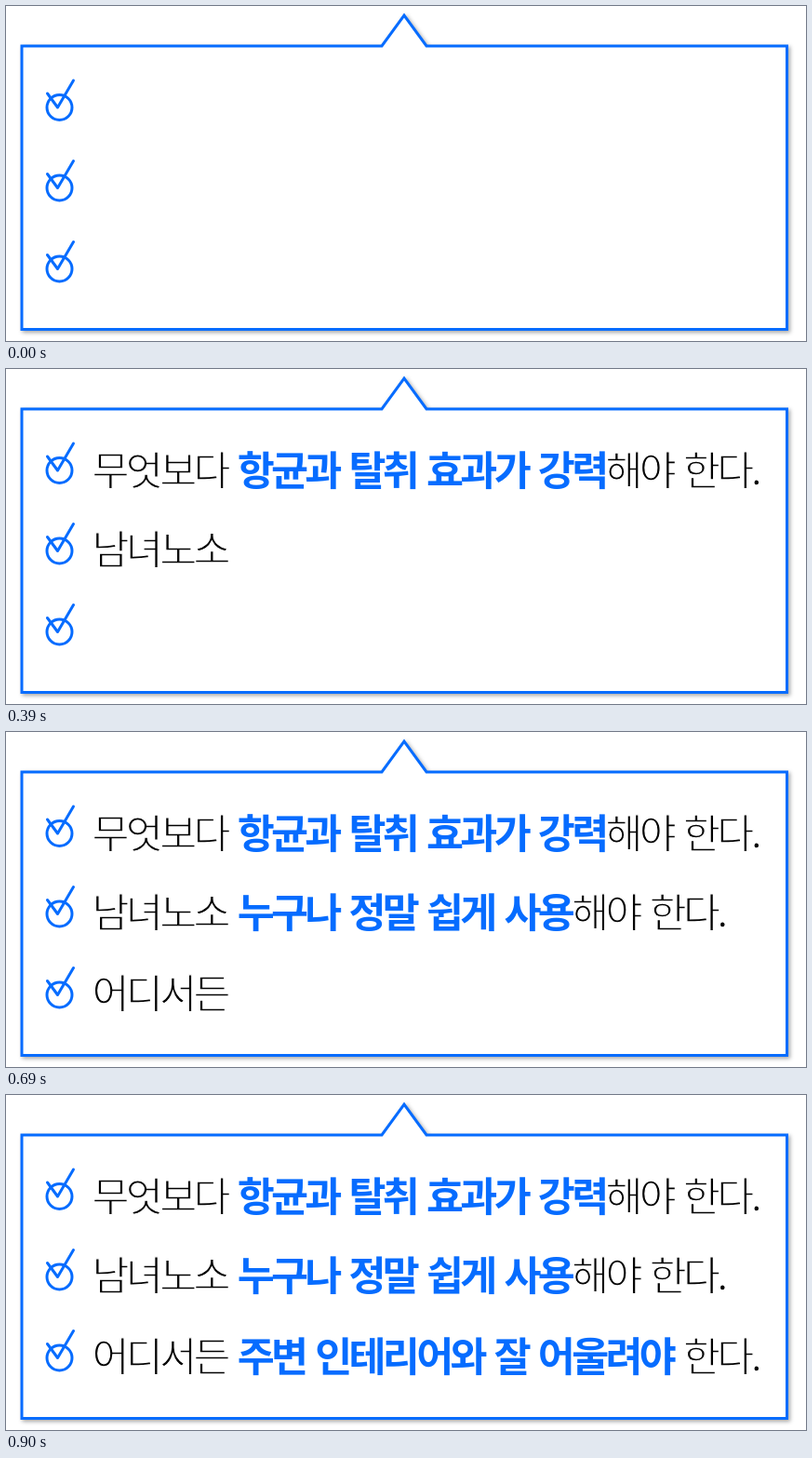
An HTML page for the animation above (1.8 s loop, 860 px wide and 360 px high).

```html
<!DOCTYPE html>
<html lang="ko">
<head>
<meta charset="utf-8">
<style>
  html, body { margin: 0; width: 100%; height: 100%; overflow: hidden; background: #fff; }
  svg { display: block; }
  .panel { fill: #fff; stroke: #066cff; stroke-width: 3; filter: drop-shadow(2px 2px 2px rgba(0, 0, 0, .35)); }
  .check { fill: none; stroke: #066cff; stroke-width: 3; stroke-linecap: round; stroke-linejoin: round; }
  text {
    font: 300 43.5px "Noto Sans CJK KR", "Noto Sans CJK", "Noto Sans KR", sans-serif;
    letter-spacing: -3.7px; word-spacing: 2.4px;
  }
  /* the white outline thins the regular weight to a light one */
  .plain { fill: #000; stroke: #fff; stroke-width: 1.3; }
  .key { font-weight: 700; fill: #066cff; }
</style>
</head>
<body>
<svg id="stage" width="860" height="360" viewBox="0 0 860 360">
  <path class="panel" d="M17 43H404L428 10L452 43H839.5V347.5H17Z"/>
</svg>
<script>
const LOOP = 1800, STEP = 30, WIPE = 300;
const lines = [
  { y: 124.5, mark: 109, from: 92, to: 830, text: ["무엇보다 ", "항균과 탈취 효과가 강력", "해야 한다."] },
  { y: 210, mark: 195.5, from: 94, to: 784, text: ["남녀노소 ", "누구나 정말 쉽게 사용", "해야 한다."] },
  { y: 296.5, mark: 282.5, from: 86, to: 814, text: ["어디서든 ", "주변 인테리어와 잘 어울려야", " 한다."] }
];
const stage = document.getElementById("stage");

function add(parent, name, attrs = {}) {
  const el = document.createElementNS("http://www.w3.org/2000/svg", name);
  for (const key in attrs) el.setAttribute(key, attrs[key]);
  return parent.appendChild(el);
}

lines.forEach((line, i) => {
  const mark = add(stage, "g", { class: "check", transform: `translate(57.5 ${line.mark})` });
  add(mark, "circle", { r: 13.5 });
  add(mark, "path", { d: "M-13 -15L-2 0L15 -29" });

  const clip = add(stage, "clipPath", { id: "wipe" + i });
  line.wipe = add(clip, "rect", { x: 80, y: line.y - 50, width: 0, height: 75 });

  const group = add(stage, "g", { "clip-path": `url(#wipe${i})` });
  const text = add(group, "text", { x: 92.5, y: line.y, style: "white-space:pre" });
  line.text.forEach((part, k) => {
    add(text, "tspan", { class: k === 1 ? "key" : "plain" }).textContent = part;
  });
});

const ease = p => p * p * (3 - 2 * p);

function draw(now) {
  const t = Math.floor((now % LOOP) / STEP + 0.01) * STEP;
  lines.forEach((line, i) => {
    const p = Math.min(1, Math.max(0, (t - i * WIPE) / WIPE));
    const edge = p ? line.from + (line.to - line.from) * ease(p) : 80;
    line.wipe.setAttribute("width", edge - 80);
  });
}

const start = performance.now();
function tick() {
  draw(performance.now() - start);
  requestAnimationFrame(tick);
}
draw(0);
requestAnimationFrame(tick);
</script>
</body>
</html>
```
